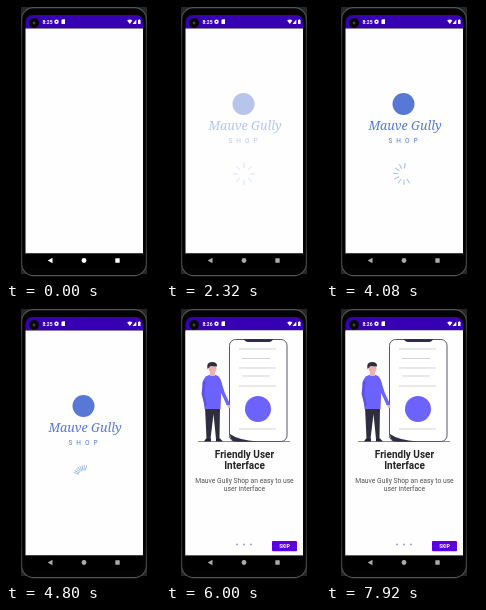
Recreate the animation shown at these times as an HTML page. Size 154 px wide and 274 px high, loop 8000 ms.

```html
<!DOCTYPE html>
<html lang="en">
<head>
<meta charset="utf-8">
<title>Shop app intro</title>
<style>
  html, body { margin: 0; height: 100%; overflow: hidden; background: #000; }
  svg { display: block; width: 100vw; height: 100vh; font-family: Roboto, sans-serif; }
  .brand { font-family: "Noto Serif", serif; font-style: italic; }
</style>
</head>
<body>
<svg viewBox="0 0 154 274">
  <defs>
    <linearGradient id="rim" x1="0" y1="0" x2="0" y2="1">
      <stop offset="0" stop-color="#555"/>
      <stop offset=".12" stop-color="#2c2c2c"/>
      <stop offset=".88" stop-color="#2c2c2c"/>
      <stop offset="1" stop-color="#555"/>
    </linearGradient>
    <clipPath id="screen"><rect x="19.5" y="9" width="117.5" height="253" rx="7"/></clipPath>
  </defs>

  <rect x="15" y="1" width="126" height="267" fill="#262626"/>
  <rect x="15.6" y="1.6" width="124.8" height="268" rx="12" fill="#030303" stroke="url(#rim)" stroke-width="1.2"/>

  <g clip-path="url(#screen)">
    <path d="M19 9H137V22.5H19Z" fill="#3700b3"/>
    <path d="M19 22.5H137V247.5H19Z" fill="#fefefe"/>

    <g id="splash">
      <g fill="#5778d4" text-anchor="middle">
        <circle cx="77.5" cy="98" r="11"/>
        <text class="brand" x="79" y="124" font-size="12.5">Mauve Gully</text>
        <text x="79" y="136.5" font-size="6.5" letter-spacing="4">SHOP</text>
      </g>
      <g id="spinner" transform="translate(78 168)" stroke-width=".9" stroke-linecap="round"></g>
    </g>

    <g id="intro">
      <path d="M19 22.5H137V247.5H19Z" fill="#fefefe"/>
      <path d="M32 133.5H124" stroke="#3f3d56" stroke-width=".6"/>

      <!-- big phone -->
      <rect x="63.5" y="31.5" width="57.5" height="102" rx="6" fill="#fff" stroke="#55546a"/>
      <path d="M64 126Q72 132 92 133.5H69Q64 133 64 126Z" fill="#2f2e49"/>
      <path d="M78 31H107Q106 34 103 34H82Q79 34 78 31Z" fill="#2b2d55"/>
      <path d="M73 41H110M76 50.5H104M73 60H110M76 68H104M73 78H110M73 121H110" stroke="#cfcfd6" stroke-width=".9"/>
      <circle cx="92" cy="101" r="13" fill="#6c63ff"/>

      <!-- standing man -->
      <path d="M39 99H54L53.5 131H50L47.5 106L44.5 131H40.5Z" fill="#2f2e41"/>
      <path d="M40 130.5H45V133.5H38ZM50 130.5H54L57 133.5H50Z" fill="#252438"/>
      <path d="M43 67H50Q55 69 55.5 76L54.5 101H38.5L36.5 76Q37 69 43 67Z" fill="#6c63ff"/>
      <path d="M53 72L57 85L62.5 97" fill="none" stroke="#6c63ff" stroke-width="3.4" stroke-linejoin="round"/>
      <path d="M38.3 73L37 86L40 98" fill="none" stroke="#5e55e6" stroke-width="2.8" stroke-linejoin="round"/>
      <circle cx="63" cy="98.5" r="1.4" fill="#f0b0b3"/>
      <path d="M44 62H49V68H44Z" fill="#f0b0b3"/>
      <circle cx="46.5" cy="60.5" r="4" fill="#f0b0b3"/>
      <path d="M41.5 61Q40 54 46 54Q51.5 54 51 58.5L44.5 58Z" fill="#2f2e41"/>

      <g text-anchor="middle">
        <g font-size="10" font-weight="700" fill="#222">
          <text x="78.5" y="149.7">Friendly User</text>
          <text x="78.5" y="161.2">Interface</text>
        </g>
        <g font-size="6.75" fill="#505050">
          <text x="78.5" y="175">Mauve Gully Shop an easy to use</text>
          <text x="78.5" y="183">user interface</text>
        </g>
      </g>

      <g fill="#9a8bdc">
        <circle cx="71" cy="236.5" r=".9"/>
        <circle cx="78" cy="236.5" r=".9"/>
        <circle cx="85" cy="236.5" r=".9"/>
      </g>
      <rect x="106" y="233" width="25" height="10.3" rx="1" fill="#5b00e3"/>
      <text x="118.5" y="240" font-size="4.8" font-weight="700" fill="#fff" text-anchor="middle">SKIP</text>
    </g>

    <!-- status bar -->
    <circle cx="28" cy="17" r="5" fill="#080808"/>
    <circle cx="28" cy="17" r="1.4" fill="#41414b"/>
    <g fill="#fff">
      <text id="clock" x="36.5" y="17.8" font-size="5" font-weight="700"></text>
      <circle cx="50.5" cy="15.7" r="2.2"/>
      <path d="M55.5 14L56.8 13.3H59V18H55.5Z"/>
      <path d="M121.2 14.5Q123.8 12.5 126.4 14.5L123.8 18Z"/>
      <path d="M130.3 13.5V18H126.5Z"/>
      <path d="M132 14H132.7V13.3H133.8V14H134.5V18H132Z"/>
    </g>
    <circle cx="50.5" cy="15.7" r=".8" fill="#3700b3"/>

    <!-- navigation bar -->
    <path d="M19 247.5H137V262H19Z"/>
    <g id="nav">
      <path d="M46.5 251.8V257.2L41.7 254.5Z"/>
      <circle cx="78" cy="254.5" r="2.4"/>
      <rect x="109.3" y="252.3" width="4.4" height="4.4" rx=".4"/>
    </g>
  </g>
</svg>
<script>
  const LOOP = 8000;
  const RAYS = 8;
  const byId = id => document.getElementById(id);
  const clamp = v => Math.min(1, Math.max(0, v));
  const ease = v => (1 - Math.cos(Math.PI * clamp(v))) / 2;

  const rays = Array.from({ length: RAYS }, (_, i) => {
    const ray = document.createElementNS("http://www.w3.org/2000/svg", "path");
    ray.setAttribute("d", "M0-6V-10.5");
    ray.setAttribute("stroke", i % 2 ? "#9cc3d0" : "#9db2e8");
    return byId("spinner").appendChild(ray);
  });

  // The rays open to a full ring, then fold up like a fan.
  function drawSpinner(t) {
    const fold = ease((t - 3120) / 2480);
    const gap = 45 - 43 * fold;
    rays.forEach((ray, i) =>
      ray.setAttribute("transform", `rotate(${18 * fold - i * gap})`));
  }

  function draw(t) {
    byId("splash").setAttribute("opacity", ease((t - 1200) / 2500));
    byId("intro").setAttribute("opacity", clamp((t - 5800) / 160));
    byId("nav").setAttribute("fill", t < 320 ? "#fff" : "#aaa");
    byId("clock").textContent = t < 4880 ? "8:25" : "8:26";
    drawSpinner(t);
  }

  const start = performance.now();
  function tick() {
    draw((performance.now() - start) % LOOP);
    requestAnimationFrame(tick);
  }
  tick();
</script>
</body>
</html>
```
